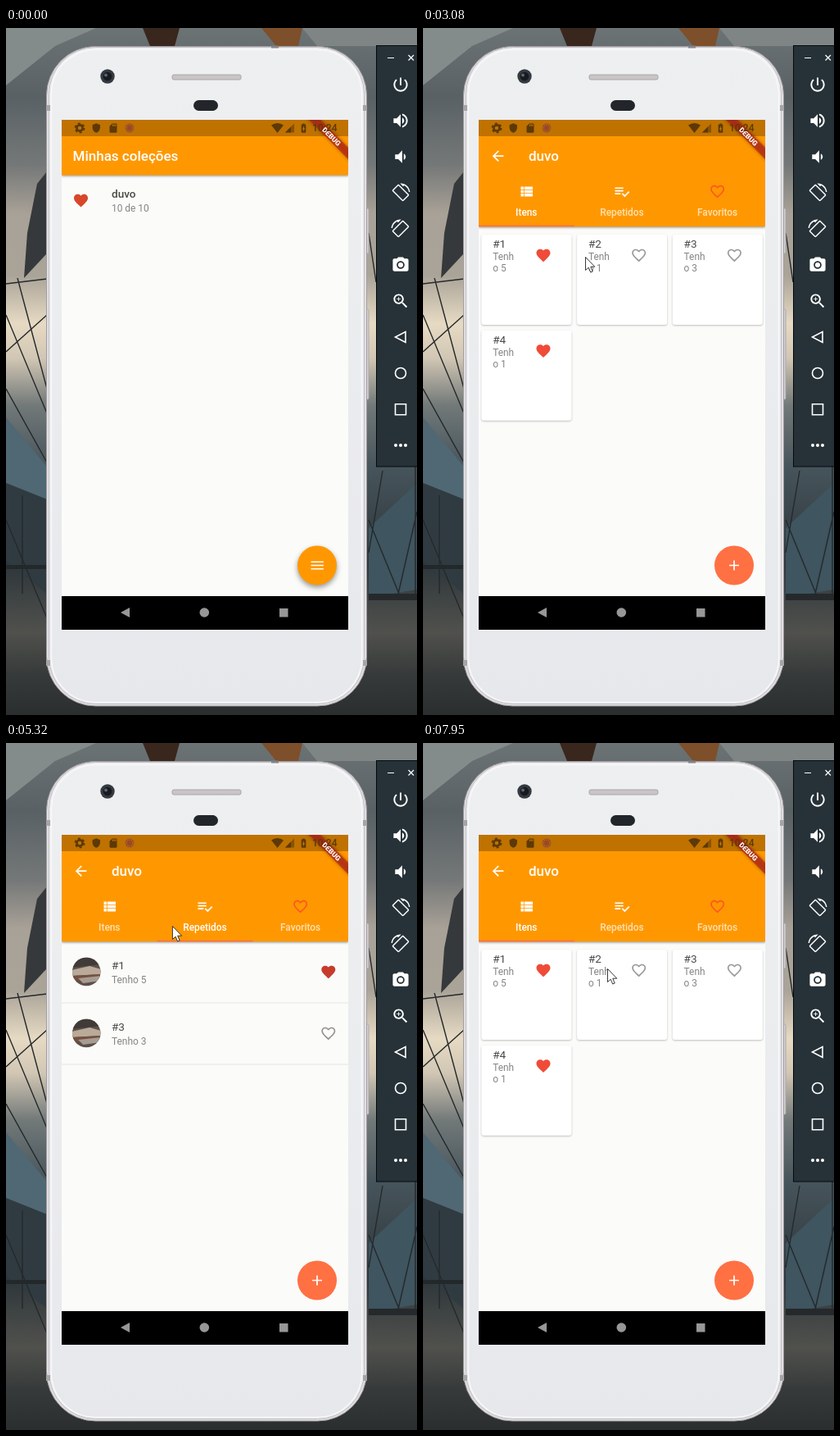
Recreate the animation shown at these times as an HTML page. Size 502x838 px, loop 8000 ms.

```html
<!DOCTYPE html>
<html lang="pt">
<head>
<meta charset="utf-8">
<title>Minhas coleções</title>
<style>
  html, body { margin: 0; width: 100%; height: 100%; overflow: hidden; background: #3c4548; }
  svg { display: block; width: 100vw; height: 100vh; }
  text { font-family: Roboto, "Noto Sans", sans-serif; }
  .head { font-size: 17px; font-weight: 500; fill: #fff; }
  .title { font-size: 13.6px; fill: #484845; }
  .sub { font-size: 11.9px; fill: #858585; }
  .tab { font-size: 11.9px; font-weight: 500; fill: #fff; text-anchor: middle; }
  .bar { fill: #ff9800; filter: drop-shadow(0 1.6px 1.8px rgba(0,0,0,.42)); }
  .card { fill: #fff; filter: drop-shadow(0 1px 1px rgba(0,0,0,.24)); }
  .line { fill: none; stroke: #fff; stroke-width: 1.6; }
</style>
</head>
<body>
<svg id="stage" viewBox="0 0 502 838" preserveAspectRatio="none"></svg>
<script>
const NAME = 'duvo';

const ICONS = {
  heart: 'M12 21.35l-1.45-1.32C5.4 15.36 2 12.28 2 8.5 2 5.42 4.42 3 7.5 3c1.74 0 3.41.81 4.5 2.09C13.09 3.81 14.76 3 16.5 3 19.58 3 22 5.42 22 8.5c0 3.78-3.4 6.86-8.55 11.54z',
  heartLine: 'M16.5 3c-1.74 0-3.41.81-4.5 2.09C10.91 3.81 9.24 3 7.5 3 4.42 3 2 5.42 2 8.5c0 3.78 3.4 6.86 8.55 11.54L12 21.35l1.45-1.32C18.6 15.36 22 12.28 22 8.5 22 5.42 19.58 3 16.5 3zm-4.4 15.55l-.1.1-.1-.1C7.14 14.24 4 11.39 4 8.5 4 6.5 5.5 5 7.5 5c1.54 0 3.04.99 3.57 2.36h1.87C13.46 5.99 14.96 5 16.5 5c2 0 3.5 1.5 3.5 3.5 0 2.89-3.14 5.74-7.9 10.05z',
  menu: 'M3 18h18v-2H3v2zm0-5h18v-2H3v2zm0-7v2h18V6H3z',
  add: 'M19 13h-6v6h-2v-6H5v-2h6V5h2v6h6v2z',
  back: 'M20 11H7.83l5.59-5.59L12 4l-8 8 8 8 1.41-1.41L7.83 13H20v-2z',
  list: 'M4 14h4v-4H4v4zm0 5h4v-4H4v4zM4 9h4V5H4v4zm5 5h12v-4H9v4zm0 5h12v-4H9v4zM9 5v4h12V5H9z',
  check: 'M14 10H2v2h12v-2zm0-4H2v2h12V6zM2 16h8v-2H2v2zm19.5-4.5L23 13l-6.99 7-4.51-4.5L13 14l3.01 3 5.49-5.5z',
  power: 'M13 3h-2v10h2V3zm4.83 2.17l-1.42 1.42C17.99 7.86 19 9.81 19 12c0 3.87-3.13 7-7 7s-7-3.13-7-7c0-2.19 1.01-4.14 2.58-5.42L6.17 5.17C4.23 6.82 3 9.26 3 12c0 4.97 4.03 9 9 9s9-4.03 9-9c0-2.74-1.23-5.18-3.17-6.83z',
  loud: 'M3 9v6h4l5 5V4L7 9H3zm13.5 3c0-1.77-1.02-3.29-2.5-4.03v8.05c1.48-.73 2.5-2.25 2.5-4.02zM14 3.23v2.06c2.89.86 5 3.54 5 6.71s-2.11 5.85-5 6.71v2.06c4.01-.91 7-4.49 7-8.77s-2.99-7.86-7-8.77z',
  quiet: 'M18.5 12c0-1.77-1.02-3.29-2.5-4.03v8.05c1.48-.73 2.5-2.25 2.5-4.02zM5 9v6h4l5 5V4L9 9H5z',
  turn: 'M16.48 2.52c3.27 1.55 5.61 4.72 5.97 8.48h1.5C23.44 4.84 18.29 0 12 0l-.66.03 3.81 3.81 1.33-1.32zm-6.25-.77c-.59-.59-1.54-.59-2.12 0L1.75 8.11c-.59.59-.59 1.54 0 2.12l12.02 12.02c.59.59 1.54.59 2.12 0l6.36-6.36c.59-.59.59-1.54 0-2.12L10.23 1.75zm4.6 19.44L2.81 9.17l6.36-6.36 12.02 12.02-6.36 6.36z',
  camera: 'M12 8.8a3.2 3.2 0 1 0 0 6.4 3.2 3.2 0 0 0 0-6.4zM9 2L7.17 4H4c-1.1 0-2 .9-2 2v12c0 1.1.9 2 2 2h16c1.1 0 2-.9 2-2V6c0-1.1-.9-2-2-2h-3.17L15 2H9zm3 15c-2.76 0-5-2.24-5-5s2.24-5 5-5 5 2.24 5 5-2.24 5-5 5z',
  zoom: 'M15.5 14h-.79l-.28-.27C15.41 12.59 16 11.11 16 9.5 16 5.91 13.09 3 9.5 3S3 5.91 3 9.5 5.91 16 9.5 16c1.61 0 3.09-.59 4.23-1.57l.27.28v.79l5 4.99L20.49 19l-4.99-5zm-6 0C7.01 14 5 11.99 5 9.5S7.01 5 9.5 5 14 7.01 14 9.5 11.99 14 9.5 14zm2.5-4h-2v2H9v-2H7V9h2V7h1v2h2v1z',
  shield: 'M12 1L3 5v6c0 5.55 3.84 10.74 9 12 5.16-1.26 9-6.45 9-12V5l-9-4z',
  sdCard: 'M18 2h-8L4 8v12c0 1.1.9 2 2 2h12c1.1 0 2-.9 2-2V4c0-1.1-.9-2-2-2zm-6 6h-2V4h2v4zm3 0h-2V4h2v4zm3 0h-2V4h2v4z',
  battery: 'M15.67 4H14V2h-4v2H8.33C7.6 4 7 4.6 7 5.33v15.33C7 21.4 7.6 22 8.33 22h7.33c.74 0 1.34-.6 1.34-1.33V5.33C17 4.6 16.4 4 15.67 4zM11 20v-5.5H9L13 7v5.5h2L11 20z'
};

const icon = (name, x, y, size = 20.4, fill = '#fff') =>
  `<path d="${ICONS[name]}" fill="${fill}" transform="translate(${x - size / 2} ${y - size / 2}) scale(${size / 24})"/>`;
const rect = (x, y, w, h, fill, extra = '') =>
  `<rect x="${x}" y="${y}" width="${w}" height="${h}" fill="${fill}" ${extra}/>`;
const text = (x, y, cls, str, extra = '') => `<text x="${x}" y="${y}" class="${cls}" ${extra}>${str}</text>`;
const poly = (points, fill) => `<polygon points="${points}" fill="${fill}"/>`;
const circle = (x, y, r, fill, extra = '') => `<circle cx="${x}" cy="${y}" r="${r}" fill="${fill}" ${extra}/>`;

const defs = `<defs>
  <linearGradient id="sky" x2="0" y2="1">
    <stop offset="0" stop-color="#6b7375"/><stop offset=".1" stop-color="#596165"/>
    <stop offset=".2" stop-color="#757878"/><stop offset=".27" stop-color="#a8a197"/>
    <stop offset=".36" stop-color="#aaa398"/><stop offset=".43" stop-color="#e6dac3"/>
    <stop offset=".48" stop-color="#d2c7b4"/><stop offset=".55" stop-color="#717878"/>
    <stop offset=".64" stop-color="#46545b"/><stop offset=".78" stop-color="#2e363a"/>
    <stop offset=".88" stop-color="#50514d"/><stop offset=".94" stop-color="#373a3a"/>
    <stop offset="1" stop-color="#2b2e2f"/>
  </linearGradient>
  <linearGradient id="shell" x2="0" y2="1">
    <stop offset="0" stop-color="#eeeff1"/><stop offset="1" stop-color="#e7e8eb"/>
  </linearGradient>
  <linearGradient id="bone" gradientUnits="userSpaceOnUse" x1="81" x2="150">
    <stop offset="0" stop-color="#e9e9e9"/><stop offset="1" stop-color="#e0e0e0"/>
  </linearGradient>
  <clipPath id="screen"><rect x="68" y="112" width="350" height="622"/></clipPath>
  <clipPath id="round"><circle r="17.3"/></clipPath>
</defs>`;

const backdrop = rect(0, 0, 502, 838, 'url(#sky)') +
  poly('0,0 110,0 60,22 0,70', '#838b8b') +
  poly('167,0 212,0 206,22 176,22', '#39261c') +
  poly('312,0 362,0 357,22 330,22', '#7d4f2a') +
  poly('362,0 502,0 502,22 380,22', '#7f8585') +
  poly('50,175 38,190 26,250 22,305 50,275', '#36393b') +
  poly('0,475 50,535 50,575 0,555', '#4f6874') +
  poly('0,555 50,575 50,690 0,650', '#303b41') +
  poly('443,610 502,555 502,685 443,695', '#3f5560') +
  rect(443, 690, 59, 8, '#25292b') + rect(0, 655, 52, 5, '#23282a') +
  `<path d="M0 312l50-6M0 350L50 470M14 305L50 440M0 395L50 350M0 440L50 530M0 600L50 720M20 570V690M443 250l9 60M443 600L480 690M460 540L443 640M502 590L478 695M500 535V690" fill="none" stroke="#24292b" stroke-width="1.4"/>`;

const phone = rect(438, 220, 5, 55, '#d5d2d4', 'rx="1.5" stroke="#aaa4a8"') +
  rect(438, 343, 5, 110, '#d5d2d4', 'rx="1.5" stroke="#aaa4a8"') +
  rect(49.5, 22.5, 391, 804.5, '#e1dfe2', 'rx="60" stroke="#a39fa2"') +
  rect(52.5, 23.5, 385, 801, 'url(#shell)', 'rx="57" stroke="#c3bfc4"') +
  rect(55.5, 26.5, 379, 796, 'url(#shell)', 'rx="54" stroke="#f8f8fa" stroke-width="1.5"') +
  [[49, 94], [436, 94], [49, 771], [436, 771]].map(([x, y]) => rect(x, y, 5, 7, '#a7a4a7')).join('') +
  rect(324, 21.5, 9, 3, '#858286') +
  circle(124, 59, 8.7, '#343a40') + circle(124, 59, 5.3, '#171b20') + circle(122, 57.5, 2, '#586773') +
  rect(203, 57, 84, 6, '#c9c5c7', 'rx="2" stroke="#aaa5a8"') +
  rect(229, 88, 30, 13, '#22262a', 'rx="6.5"');

const home = rect(68, 112, 350, 581, '#fbfbf9') + rect(68, 132, 350, 47.5, '', 'class="bar"') +
  rect(68, 112, 350, 20, '#bf7200') +
  text(81.5, 162, 'head', 'Minhas coleções') +
  icon('heart', 91.5, 210.5, 20.4, '#d8472a') +
  text(129, 207, 'title', NAME, 'font-weight="500"') + text(129, 224, 'sub', '10 de 10');

const skeleton = [256, 303.7, 351.3].map(y =>
  [[81, 0, 41, 41], [135, 0, 269, 6.5], [135, 10.2, 269, 6.5], [135, 20.6, 34.5, 6.5]].map(([x, dy, w, h]) =>
    `<rect x="${x}" y="${y + dy}" width="${w}" height="${h}"/>`).join('')).join('');

const cards = [5, 1, 3, 1].map((count, i) => {
  const full = i % 3 === 0;
  return `<g transform="translate(${71.4 + i % 3 * 116.7} ${252 + (i > 2) * 116.7})">` +
    `<rect class="card" width="110" height="110" rx="3"/>` +
    text(13.8, 16, 'title', '#' + (i + 1)) + text(13.8, 31, 'sub', 'Tenh') + text(13.8, 45, 'sub', 'o ' + count) +
    icon(full ? 'heart' : 'heartLine', 75.6, 25.3, 20.4, full ? '#ef4b38' : '#9b9b9b') + '</g>';
}).join('');

const photo = `<g clip-path="url(#round)"><rect x="-18" y="-18" width="36" height="36" fill="#5d5049"/>
  <path d="M-18-18H18V-9L-18-5z" fill="#403a39"/><path d="M-18-2L4-7 18-3V3L-18 5z" fill="#b9aa99"/>
  <path d="M-18 5L18 3V8L-18 11z" fill="#765040"/><path d="M-10 8L18 5V11L-4 14z" fill="#a79c92"/></g>`;
const repeats = [[1, 5], [3, 3]].map(([id, count], i) =>
  `<g transform="translate(0 ${i * 75})"><g transform="translate(98.2 279)">${photo}</g>` +
  text(129, 276, 'title', '#' + id) + text(129, 293, 'sub', 'Tenho ' + count) +
  icon(i ? 'heartLine' : 'heart', 393.8, 279.3, 20.4, i ? '#989393' : '#c53c2d') +
  rect(68, 316.5, 350, 1, '#e5e5e5') + '</g>').join('');

const tabs = ['Itens', 'Repetidos', 'Favoritos'].map((label, i) => {
  const x = 126.3 + i * 116.67;
  return icon(['list', 'check', 'heartLine'][i], x, 199.5, 20.4, i > 1 ? '#ff5722' : '#fff') +
    text(x, 229, 'tab', label, `id="tab${i}" opacity=".7"`);
}).join('');

const detail = `<g id="detail">${rect(68, 112, 350, 581, '#fbfbf9')}
  <g id="pager"><g id="bones0">${skeleton}</g><g id="cards">${cards}</g>
    <g transform="translate(350)"><g id="bones1">${skeleton}</g><g id="repeats">${repeats}</g></g></g>
  ${rect(68, 112, 350, 130.3, '', 'class="bar"')}${rect(68, 112, 350, 20, '#bf7200')}
  ${rect(68, 180, 116.7, 62.3, '#d0d0d0', 'id="ink"')}
  ${icon('back', 91.6, 156.2)}${text(129, 162, 'head', NAME)}${tabs}
  ${rect(68, 240.6, 116.7, 1.7, '#ff7043', 'id="mark"')}</g>`;

const fab = `<g id="fab">
  <g id="fabMenu"><circle cx="380" cy="655.5" r="24" fill="#ff9800" style="filter:drop-shadow(0 3px 3px rgba(0,0,0,.4))"/>${icon('menu', 380.2, 655.5)}</g>
  <g id="fabAdd">${circle(380, 655.5, 24, '#ff7043')}${icon('add', 380, 655.5)}</g></g>`;

const ink = '#5c3906';
const status = circle(90, 122, 3.6, 'none', `stroke="${ink}" stroke-width="2.6"`) +
  circle(90, 122, 5.4, 'none', `stroke="${ink}" stroke-width="2" stroke-dasharray="2.83"`) +
  icon('shield', 110.3, 122, 12.5, ink) + icon('sdCard', 131, 122, 13.5, ink) +
  circle(151, 122, 5.4, '#9a4a1f') + circle(151, 122, 4, 'none', 'stroke="#c47a4c" stroke-dasharray="1.5 1"') +
  `<path d="M324 118.5Q331.5 113.5 339 118.5L331.5 128z" fill="${ink}"/>` +
  `<path d="M341 127.5H352V116.5z" fill="${ink}" opacity=".55"/><path d="M341 127.5H348V120.5z" fill="${ink}"/>` +
  icon('battery', 363.5, 122, 13.5, ink) +
  text(374, 126.3, '', '10:24', `font-size="12" font-weight="500" fill="${ink}"`);

const banner = `<g transform="translate(418 112) rotate(45)">
  <rect x="-50" y="23.8" width="100" height="10.2" fill="#b71c1c" fill-opacity=".66" style="filter:drop-shadow(0 0 2px rgba(0,0,0,.5))"/>
  <text y="32" font-size="8.7" font-weight="900" fill="#fff" text-anchor="middle">DEBUG</text></g>`;

const nav = rect(68, 693, 350, 41, '#000') + poly('140,713 151,707 151,719', '#979797') +
  circle(242.3, 713, 5.8, '#979797') + rect(334, 708, 10.5, 10.5, '#979797');

const tools = ['power', 'loud', 'quiet', 'turn', 'turn', 'camera', 'zoom'].map((name, i) =>
  `<g transform="translate(482 ${69 + i * 44}) scale(${i === 4 ? -1 : 1} 1)">${icon(name, 0, 0, 23)}</g>`).join('');
const panel = rect(452.5, 21.5, 60, 513.5, '#263238', 'stroke="#070a0b"') + tools +
  `<path d="M466 36.5h8M491.5 33l6.5 6.5M498 33l-6.5 6.5" class="line" style="stroke-width:1.2"/>` +
  `<path d="M475.5 377L488 370.5V383.5zM475.5 458.8h13v13h-13z" class="line"/>` +
  circle(482, 421, 6.5, 'none', 'class="line"') +
  [476, 482, 488].map(x => circle(x, 509, 2, '#fff')).join('');

const cursor = `<g id="cursor">${circle(0, 0, 12, '#ff0', 'id="click" fill-opacity=".47"')}
  <path d="M.5.5V16.5L4.2 13.2 6.7 19 9.2 18 6.8 12.2H11.8z" fill="#fff" stroke="#222" stroke-width=".9"/></g>`;

const $ = id => document.getElementById(id);
$('stage').innerHTML = defs + backdrop + phone +
  `<g clip-path="url(#screen)">${home}${detail}${fab}${banner}${status}${nav}</g>` + panel + cursor;

// Pointer stops: time, x, y
const PATH = [
  [520, 441, 806], [830, 310, 480], [1060, 228, 305], [1290, 188, 239], [1680, 162, 215],
  [2880, 162, 215], [3074, 198, 279], [3310, 226, 290], [3450, 226, 290], [3950, 243, 196],
  [4980, 243, 196], [5318, 203, 223], [5783, 135, 214], [6015, 124, 209], [7000, 124, 209],
  [7250, 165, 243], [7560, 210, 266], [7950, 225, 275]
];
function pointer(t) {
  const i = PATH.findIndex(p => p[0] > t);
  if (i < 1) return PATH[i ? PATH.length - 1 : 0].slice(1);
  const [a, b] = [PATH[i - 1], PATH[i]], f = (t - a[0]) / (b[0] - a[0]);
  return [a[1] + (b[1] - a[1]) * f, a[2] + (b[2] - a[2]) * f];
}

const LOOP = 8000, STEP = 77.4;
const glide = (t, start, length) => 1 - (1 - Math.min(1, Math.max(0, (t - start) / length))) ** 2.2;
const show = (id, on) => $(id).setAttribute('visibility', on ? 'inherit' : 'hidden');
const move = (id, x, y = 0) => $(id).setAttribute('transform', `translate(${x} ${y})`);
const within = (k, ...spans) => spans.some(([from, to]) => k >= from && k < to);

function draw(ms) {
  // The screen refreshes in even steps
  const k = Math.floor((ms - 510) / STEP), t = 520 + k * STEP;
  const slide = 350 * (1 - glide(t, 2097, 190));
  const tab = glide(t, 4170, 300) - glide(t, 6704, 300);

  show('detail', k >= 21);
  move('detail', slide);
  show('fabMenu', k < 19);
  show('fabAdd', k >= 19);
  move('fab', k < 21 ? 0 : slide);

  const loaded = within(k, [31, 48], [92, 999]), listed = within(k, [58, 81]);
  show('cards', loaded);
  show('bones0', !loaded);
  show('repeats', listed);
  show('bones1', !listed);
  const bone = within(k, [21, 27], [47, 56]) ? 'url(#bone)' : '#e0e0e0';
  $('bones0').setAttribute('fill', bone);
  $('bones1').setAttribute('fill', bone);

  move('pager', -350 * tab);
  move('mark', 116.67 * tab);
  $('tab0').setAttribute('opacity', 1 - .3 * tab);
  $('tab1').setAttribute('opacity', .7 + .3 * tab);
  const second = within(k, [46, 50]);
  move('ink', second ? 116.67 : 0);
  $('ink').setAttribute('opacity', second ? .1 : within(k, [78, 82]) ? .27 : within(k, [82, 84]) ? .12 : 0);

  show('cursor', k >= 0);
  show('click', within(k, [15, 17], [45, 47], [76, 78]));
  move('cursor', ...pointer(t));
}

function tick() {
  draw(performance.now() % LOOP);
  requestAnimationFrame(tick);
}
tick();
</script>
</body>
</html>
```
